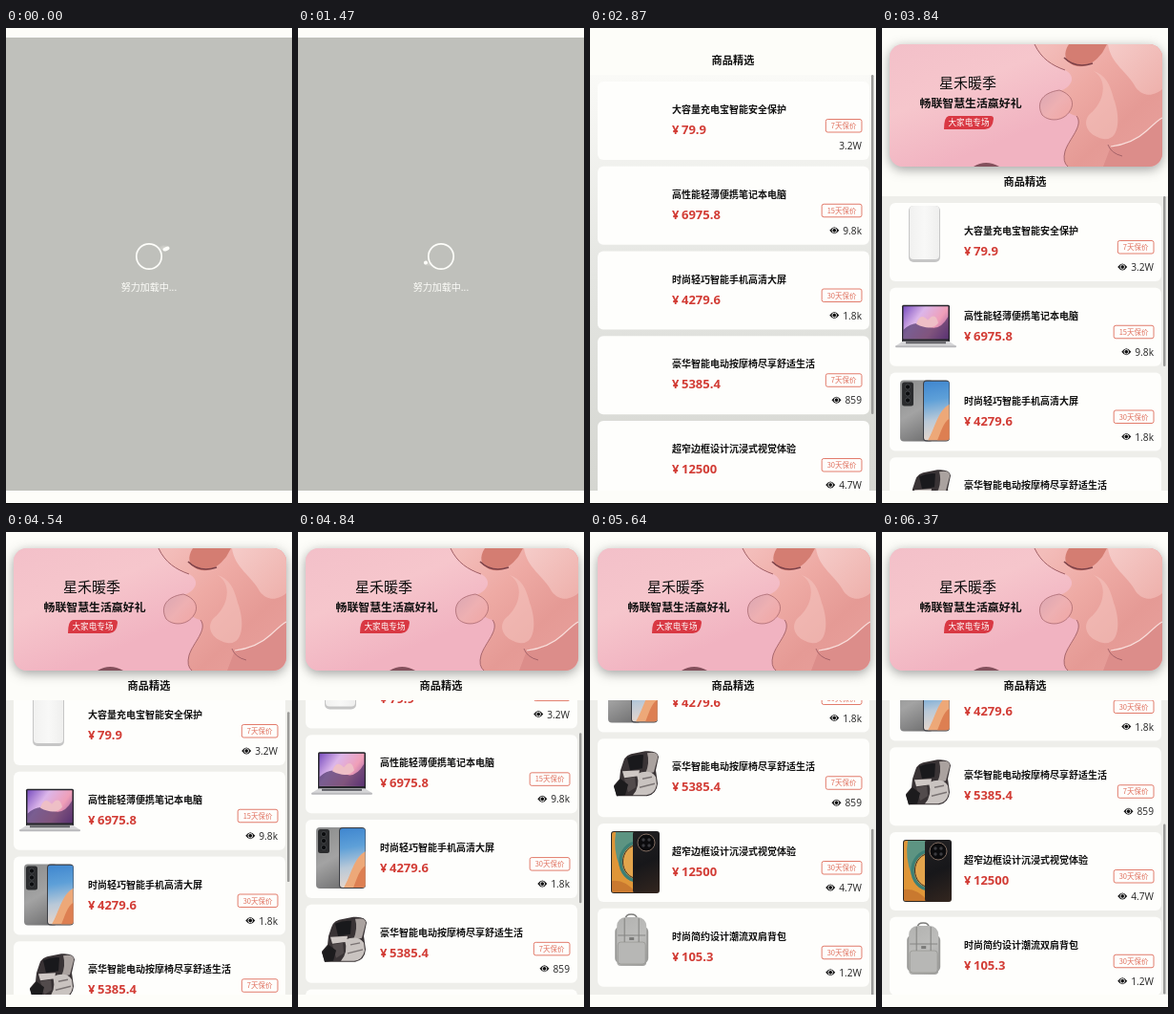
These frames come from a looping animation (300 by 498 pixels, 6440 ms). An HTML page with a canvas:

```html
<!DOCTYPE html>
<html lang="zh-CN">
<head>
<meta charset="utf-8">
<style>
html, body { margin: 0; width: 100%; height: 100%; overflow: hidden; background: #fdfdf9; }
canvas { display: block; width: 300px; height: 498px; }
</style>
</head>
<body>
<canvas id="stage"></canvas>
<script>
const W = 300, H = 498, LOOP = 6440;
const LIST_AT = 2870, BANNER_AT = 2940, IMAGES_AT = 3010;
const PAGE = '#fdfdf9', RED = '#d23c35', BADGE = '#df6e5c', INK = '#111';
const CJK = '"Noto Sans CJK SC", "Noto Sans CJK", sans-serif';
const LATIN = '"Open Sans", "Noto Sans", sans-serif';
const STEP = 88.75, CARD_H = 82, LIST_BOTTOM = 484, CONTENT = 533;

const canvas = document.getElementById('stage');
const c = canvas.getContext('2d');
const dpr = window.devicePixelRatio || 1;
canvas.width = W * dpr;
canvas.height = H * dpr;

const items = [
  { name: '大容量充电宝智能安全保护', price: '79.9', days: 7, views: '3.2W', draw: drawPowerBank },
  { name: '高性能轻薄便携笔记本电脑', price: '6975.8', days: 15, views: '9.8k', draw: drawLaptop },
  { name: '时尚轻巧智能手机高清大屏', price: '4279.6', days: 30, views: '1.8k', draw: drawPhones },
  { name: '豪华智能电动按摩椅尽享舒适生活', price: '5385.4', days: 7, views: '859', draw: drawChair },
  { name: '超窄边框设计沉浸式视觉体验', price: '12500', days: 30, views: '4.7W', draw: drawDarkPhone },
  { name: '时尚简约设计潮流双肩背包', price: '105.3', days: 30, views: '1.2W', draw: drawBackpack }
];

// [time, scroll offset]
const scrollKeys = [[4340, 0], [4540, 21], [5170, 112], [5640, 233], [5800, 233], [6370, 224], [LOOP, 224]];

function scrollAt(t) {
  const k = scrollKeys;
  if (t <= k[0][0]) return 0;
  const slope = i => i < 0 || i >= k.length - 1 ? 0 : (k[i + 1][1] - k[i][1]) / (k[i + 1][0] - k[i][0]);
  const tangent = i => {
    const a = slope(i - 1), b = slope(i);
    return a * b <= 0 ? 0 : 2 * a * b / (a + b);
  };
  let i = 0;
  while (i < k.length - 2 && t > k[i + 1][0]) i++;
  const d = k[i + 1][0] - k[i][0], u = (t - k[i][0]) / d, v = 1 - u;
  return k[i][1] * v * v * (1 + 2 * u) + k[i + 1][1] * u * u * (3 - 2 * u)
    + d * u * v * (tangent(i) * v - tangent(i + 1) * u);
}

function rect(x, y, w, h, fill) {
  c.fillStyle = fill;
  c.fillRect(x, y, w, h);
}

function round(x, y, w, h, r, fill, stroke, lw = 1) {
  c.beginPath();
  c.roundRect(x, y, w, h, r);
  paint(fill, stroke, lw);
}

function ellipse(x, y, rx, ry, fill, stroke, lw = 1) {
  c.beginPath();
  c.ellipse(x, y, rx, ry, 0, 0, Math.PI * 2);
  paint(fill, stroke, lw);
}

function paint(fill, stroke, lw) {
  if (fill) { c.fillStyle = fill; c.fill(); }
  if (stroke) { c.strokeStyle = stroke; c.lineWidth = lw; c.stroke(); }
}

function shape(d, fill, stroke, lw = 1) {
  const path = new Path2D(d);
  if (fill) { c.fillStyle = fill; c.fill(path); }
  if (stroke) { c.strokeStyle = stroke; c.lineWidth = lw; c.stroke(path); }
}

function clipped(x, y, w, h, r, draw) {
  c.save();
  c.beginPath();
  c.roundRect(x, y, w, h, r);
  c.clip();
  draw();
  c.restore();
}

function gradient(x0, y0, x1, y1, ...colors) {
  const g = c.createLinearGradient(x0, y0, x1, y1);
  colors.forEach((col, i) => g.addColorStop(i / (colors.length - 1), col));
  return g;
}

function text(s, x, baseline, font, fill, align = 'left') {
  c.font = font;
  c.fillStyle = fill;
  c.textAlign = align;
  c.fillText(s, x, baseline);
}

function drawLoader(t) {
  rect(0, 10, W, 474, '#bfc0bb');
  const a = t / 980 * Math.PI * 2;
  const moon = lag => {
    const p = a - lag;
    c.save();
    c.translate(151, 238.3);
    c.rotate(-0.4);
    ellipse(18.5 * Math.cos(p), 5 * Math.sin(p), 2.9 + 0.8 * Math.cos(p), 2, PAGE);
    c.restore();
  };
  const front = Math.sin(a) >= -0.05;
  if (!front) moon(0);
  ellipse(150, 239, 13.2, 13.2, '#bfc0bb', PAGE, 1.7);
  if (front) {
    c.globalAlpha = 0.12;
    for (let i = 1; i < 4; i++) moon(i * 0.22);
    c.globalAlpha = 1;
    moon(0);
  }
  text('努力加载中...', 150, 275, '10px ' + CJK, PAGE, 'center');
}

function drawPowerBank() {
  round(28, 3, 33, 59, 5, '#c6c6c6');
  round(29, 3, 31, 56, 4, gradient(29, 0, 60, 0, '#f1f1f0', '#f8f8f7', '#efefee'));
}

function drawLaptop() {
  round(21, 18, 50, 39, 1.5, '#25252b');
  rect(22.5, 19.5, 47, 34, gradient(22, 20, 69, 54, '#7a4fc0', '#dcb6ea', '#ef9fb8', '#8a4a9c'));
  shape('M22.5 44 Q34 33 47 40 T69.5 30 V53.5 H22.5Z', 'rgba(58,36,88,.6)');
  shape('M36 38 Q40 25 48 34 Q56 24 59 37 Q52 46 36 38Z', '#eebfc6');
  shape('M22 56 H70 L78 61 H14Z', '#d6d6d8');
  rect(25, 56.5, 42, 2, '#5c5c62');
  round(14, 60.5, 64, 2, 1, '#b9b9bc');
}

function drawPhones() {
  round(19, 8, 35, 64, 4, gradient(19, 8, 54, 72, '#8b8c8c', '#a3a3a3', '#6b6b6c'));
  round(21, 10, 12, 25, 2.5, '#2b2c2e');
  for (let i = 0; i < 3; i++) ellipse(27, 15 + i * 7, 2.6, 2.6, '#0b0c0e', '#5a5d60', 0.6);
  round(43, 8, 28, 64, 4, '#3c3e44');
  clipped(44, 9, 26.5, 62, 3, () => {
    rect(44, 9, 27, 62, gradient(44, 9, 54, 71, '#3f86cf', '#5ea0d8', '#b9c9d8', '#e6d6cc'));
    shape('M48 71 C56 58 58 40 71 33 V71Z', '#eda878');
    shape('M58 71 C62 62 64 52 71 48 V71Z', '#dd7f52');
  });
}

function drawChair() {
  shape('M35 24 Q37 16 48 15 L58 13 Q71 12 72 19 L69 33 L71 47 Q70 58 60 60 L28 60 L25 49 L31 42 L32 33Z', '#393335');
  shape('M60 15 Q72 13 71 20 L67 35 L58 37 Q63 25 60 15Z', '#aaa29f');
  shape('M39 20 Q48 16 56 17 L55 31 L42 33Z', '#19191c');
  shape('M49 37 Q63 31 69 40 L70 48 Q68 58 59 59 L45 59 Q53 50 49 37Z', '#c9c3c0');
  shape('M55 42 L65 40 M52 51 L68 47', null, '#7a7373', 1.4);
  shape('M34 34 L52 33 L51 39 L36 41Z', '#cfc8c5');
  shape('M36 42 L47 40 L48 51 L40 56Z', '#524b4c');
  shape('M25 50 L32 42 L40 48 L37 59 L28 60Z', '#1c1b1d');
}

function drawDarkPhone() {
  round(22, 8, 28, 65, 3, '#2c2823');
  clipped(23, 9, 27, 63, 2, () => {
    rect(23, 9, 27, 63, '#df9638');
    shape('M27 9 H50 V25 Q34 27 31 45 Q24 27 27 9Z', '#5d9482');
    ellipse(50, 40, 18, 20, '#e3a44c', '#3d7f75', 3.5);
    ellipse(50, 40, 15.5, 17.5, null, '#3a3128', 1);
    shape('M23 60 Q36 58 48 72 H23Z', '#c9792f');
  });
  round(45, 8, 28, 65, 3, gradient(45, 8, 73, 73, '#222123', '#17171a', '#33261f'));
  ellipse(59, 20, 9, 9, '#0b0b0d', '#806c60', 1);
  for (const x of [56, 62]) for (const y of [17, 23]) ellipse(x, y, 1.7, 1.7, '#3b3b3f');
}

function drawBackpack() {
  c.save();
  c.translate(-0.8, -2.7);
  shape('M38 14 Q38 9 44 9 Q50 9 50 14', null, '#7d7d7b', 1.5);
  round(27, 22, 35, 38, 5, '#9a9a98');
  round(29, 12, 31, 51, [9, 9, 4, 4], gradient(29, 12, 60, 62, '#b2b2b0', '#bdbdbb', '#a2a2a0'));
  round(30, 38, 29, 23, 3, '#b7b7b5', '#92928f', 0.7);
  shape('M30 31 H59 M37 13 V38 M52 13 V38', null, '#868684', 1.1);
  rect(42, 33, 5, 3, '#7b7b79');
  c.restore();
}

function drawEye(x, y) {
  shape(`M${x - 5} ${y} Q${x} ${y - 7} ${x + 5} ${y} Q${x} ${y + 7} ${x - 5} ${y}Z`, INK);
  ellipse(x, y, 2.3, 2.3, null, '#fff', 0.9);
}

function drawCard(item, y, images, eye) {
  c.save();
  c.translate(0, y);
  round(8, 0, 285, CARD_H, 6, '#fefefc');
  if (images) item.draw();
  text(item.name, 86, 33, '600 10px ' + CJK, INK);
  const priceFont = 'bold 13px ' + LATIN;
  text('¥', 86, 55, priceFont, RED);
  text(item.price, 96, 55, priceFont, RED);

  const label = item.days + '天保价';
  c.font = '7.5px ' + CJK;
  const w = c.measureText(label).width + 11;
  round(285 - w, 39.5, w, 13.5, 2, null, BADGE, 0.9);
  text(label, 285 - w / 2, 49, c.font, BADGE, 'center');

  text(item.views, 285, 71, '10.2px ' + LATIN, '#222', 'right');
  if (eye) drawEye(285 - c.measureText(item.views).width - 9, 67);
  c.restore();
}

// Soft folded forms on the right of the banner.
function drawBannerArt() {
  const edge = '#a05f66';
  rect(8, 17, 286, 128, gradient(8, 17, 60, 145, '#f3c0c9', '#f6c6cc', '#f1b3c1'));
  shape('M160 17 C167 32 178 39 192 44 C204 50 200 62 186 66 C181 76 190 88 204 92 C212 102 196 116 192 129 Q189 140 195 145 H294 V17Z',
    gradient(170, 20, 285, 145, '#f3bdba', '#eeaaa4', '#e59a95', '#e8a19d'));
  shape('M196 17 C190 26 191 35 201 39 C213 43 222 37 231 26 L236 17Z', '#d47d72');
  shape('M191 31 Q203 43 221 37', null, '#7c4148', 1.6);
  shape('M160 17 C167 32 178 39 192 44', null, edge, 1);
  shape('M186 65 C166 68 162 80 168 91 C176 99 191 97 197 87 C203 78 198 69 186 65Z',
    gradient(166, 66, 198, 96, '#dba6b2', '#eeb0b2', '#f0a6a4'), edge, 0.7);
  shape('M237 17 C240 38 258 46 266 62 C275 74 287 70 294 64 V17Z', gradient(240, 17, 294, 70, '#f5cbc8', '#eeb0ab'));
  shape('M222 45 C238 55 233 78 218 90 C210 98 214 112 232 116 C250 119 250 92 243 74 C239 58 234 49 222 45Z',
    'rgba(246,198,193,.55)');
  shape('M240 124 Q263 121 277 108 T294 94 V145 H232Z', '#dc8d8a');
  shape('M240 124 Q263 121 277 108 T294 94', null, '#f9dedb', 1.2);
  shape('M204 92 C212 102 196 116 192 129 Q189 140 195 145 M237 122 Q240 131 252 134', null, edge, 0.9);
  shape('M96 145 Q109 137 123 145Z', '#83505c');
}

function drawBanner() {
  c.save();
  c.shadowColor = 'rgba(70,70,70,.5)';
  c.shadowBlur = 12 * dpr;
  c.shadowOffsetY = 3 * dpr;
  round(8, 17, 286, 128, 14, '#efc0cb');
  c.restore();
  clipped(8, 17, 286, 128, 14, drawBannerArt);

  text('星禾暖季', 60, 63, '500 15px ' + CJK, INK);
  text('畅联智慧生活赢好礼', 39.5, 82.7, 'bold 11.9px ' + CJK, INK);
  shape('M70 92 H114 Q117 92 117 95 Q116 106 108 106 H65 Q65 93 70 92Z', '#d93843');
  text('大家电专场', 91, 102.3, '8.6px ' + CJK, '#fff', 'center');
}

function drawShop(t) {
  const banner = t >= BANNER_AT;
  const top = banner ? 176 : 49;
  const view = LIST_BOTTOM - top;
  const scroll = scrollAt(t);
  clipped(0, top, W, view, 0, () => {
    rect(0, top, W, view, '#eeeeea');
    c.globalAlpha = Math.max(0, 1 - (t - LIST_AT) / 500);
    rect(0, top, W, view, gradient(0, top, 0, LIST_BOTTOM, '#fafaf7', '#e4e5e1', '#d5d6d1'));
    c.globalAlpha = 1;
    items.forEach((item, i) => {
      const y = top + 7 + i * STEP - scroll;
      if (y < LIST_BOTTOM && y + CARD_H > top) drawCard(item, y, t >= IMAGES_AT, banner || i > 0);
    });
    round(295, top + scroll * view / CONTENT, 2.5, view * view / CONTENT, 1.2, '#9b9b99');
  });
  if (banner) drawBanner();
  text('商品精选', 150, banner ? 165 : 37.6, 'bold 11.2px ' + CJK, INK, 'center');
}

let start;
function frame(now) {
  start ??= now;
  const t = (now - start) % LOOP;
  c.setTransform(dpr, 0, 0, dpr, 0, 0);
  rect(0, 0, W, H, PAGE);
  if (t < LIST_AT) drawLoader(t);
  else drawShop(t);
  rect(0, 497, W, 1, '#050505');
  requestAnimationFrame(frame);
}
requestAnimationFrame(frame);
</script>
</body>
</html>
```
